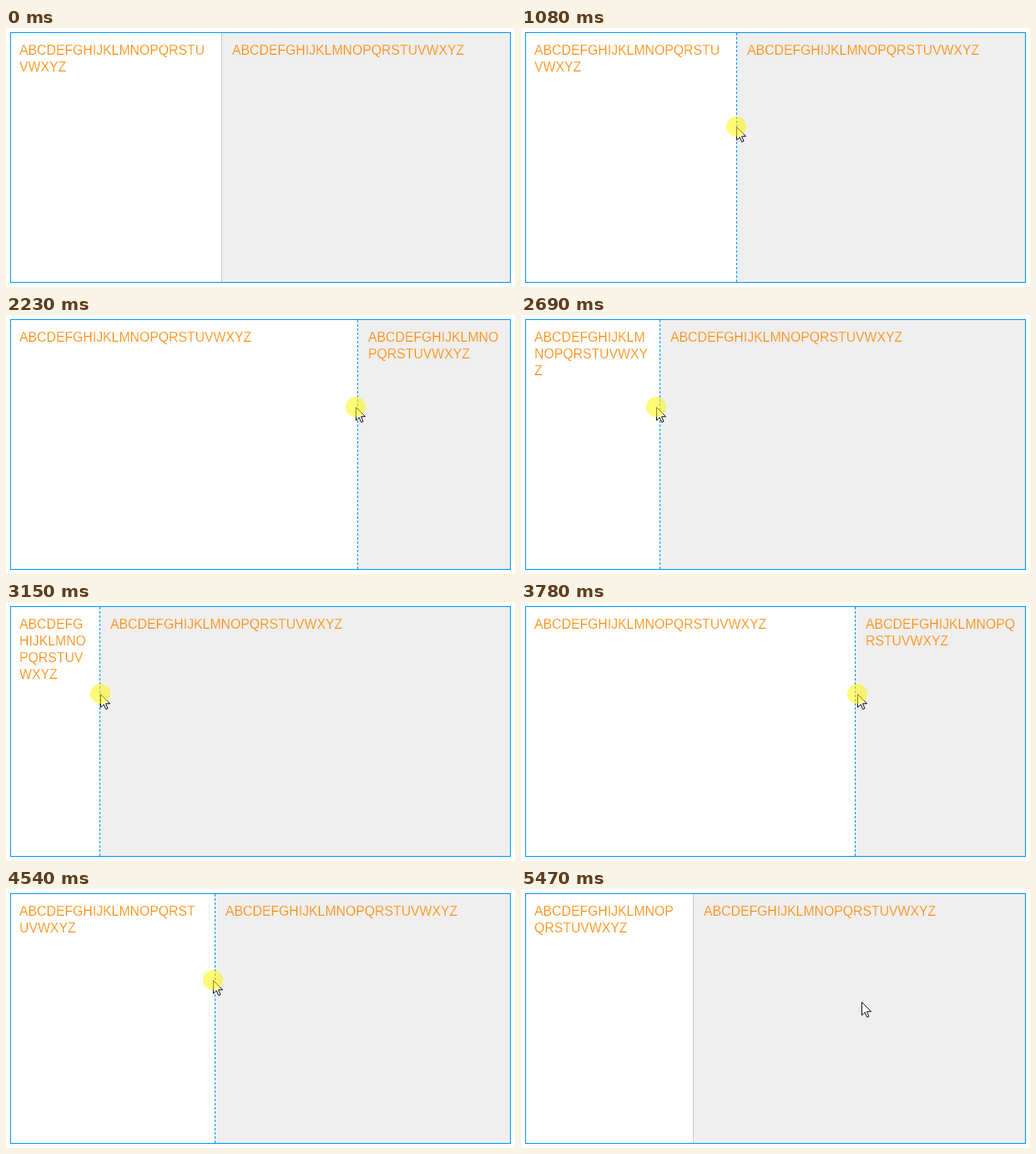
An HTML page for the animation above (5.93 s loop, 610 by 310 pixels).

```html
<!DOCTYPE html>
<html lang="en">
<head>
<meta charset="utf-8">
<title>Resizable panes</title>
<style>
  html, body { margin: 0; width: 100%; height: 100%; overflow: hidden; background: #fff; }
  #box {
    position: absolute; left: 5px; top: 5px; width: 598px; height: 298px;
    border: 1px solid #0094f6;
  }
  .pane {
    position: absolute; top: 0; bottom: 0; box-sizing: border-box; overflow: hidden;
    padding: 11px 10.5px 0 12px; color: #ff8a0a; word-break: break-all;
    font: 15.8px/20px "Liberation Sans", Arial, sans-serif; font-kerning: none;
  }
  /* A hairline in the pane colour thins the letters. */
  #left { left: 0; padding: 11px 12.5px 0 10px; background: #fff; -webkit-text-stroke: .25px #fff; }
  #right { right: 0; background: #efefef; -webkit-text-stroke: .25px #efefef; }
  #bar { position: absolute; top: 0; bottom: 0; border-left: 1px solid #c8c8c8; }
  #bar.hot { border-left: 1px dashed #0094f6; }
  #pointer { position: absolute; left: 0; top: 0; overflow: visible; }
</style>
</head>
<body>
<div id="box">
  <div class="pane" id="left">ABCDEFGHIJKLMNOPQRSTUVWXYZ</div>
  <div class="pane" id="right">ABCDEFGHIJKLMNOPQRSTUVWXYZ</div>
  <div id="bar"></div>
</div>
<svg id="pointer" width="1" height="1">
  <path d="M.5 .5V16.2L4.2 12.6L6.7 18.4L9 17.4L6.5 11.7H11.6Z" fill="#fff" stroke="#111"/>
  <circle id="press" r="12" fill="#fff600" fill-opacity=".53"/>
</svg>
<script>
const LOOP = 5930, FPS = 13;
const HOVER = 12, PRESS = 14, DRAG = 15, DROP = 62.1, LAG = .1;  // in steps

const moves = [
  { from: 0, to: 9, x: 262, y: 120 },       // enter
  { from: 9, to: 12, x: 258, y: 118 },      // reach the divider
  { from: DRAG, to: 24.8, x: 446, y: 110 },
  { from: 27, to: 37.9, x: 106, y: 110 },
  { from: 40, to: 50.5, x: 418, y: 110 },
  { from: 51.5, to: DROP, x: 206, y: 109 },
  { from: 62.5, to: 68.7, x: 408, y: 135 }  // leave
];

const $ = id => document.getElementById(id);
const clamp = (v, lo, hi) => Math.min(hi, Math.max(lo, v));
const ease = u => (1 - Math.cos(Math.PI * clamp(u, 0, 1))) / 2;

function pointerAt(step) {
  let x = 606, y = 135;
  for (const m of moves) {
    const e = ease((step - m.from) / (m.to - m.from));
    x += (m.x - x) * e;
    y += (m.y - y) * e;
  }
  return { x: Math.round(x), y: Math.round(y) };
}

function draw(time) {
  const step = Math.floor((time + 16) * FPS / 1000);
  const { x, y } = pointerAt(step);
  const split = pointerAt(clamp(step - LAG, DRAG, DROP)).x;
  $("left").style.width = $("bar").style.left = split - 6 + "px";
  $("right").style.width = 603 - split + "px";
  $("bar").className = step >= HOVER && step <= DROP + 1 ? "hot" : "";
  $("pointer").style.visibility = step ? "visible" : "hidden";
  $("pointer").style.transform = `translate(${x}px, ${y}px)`;
  $("press").style.display = step >= PRESS && step <= DROP ? "" : "none";
}

function tick() {
  draw(performance.now() % LOOP);
  requestAnimationFrame(tick);
}
tick();
</script>
</body>
</html>
```
